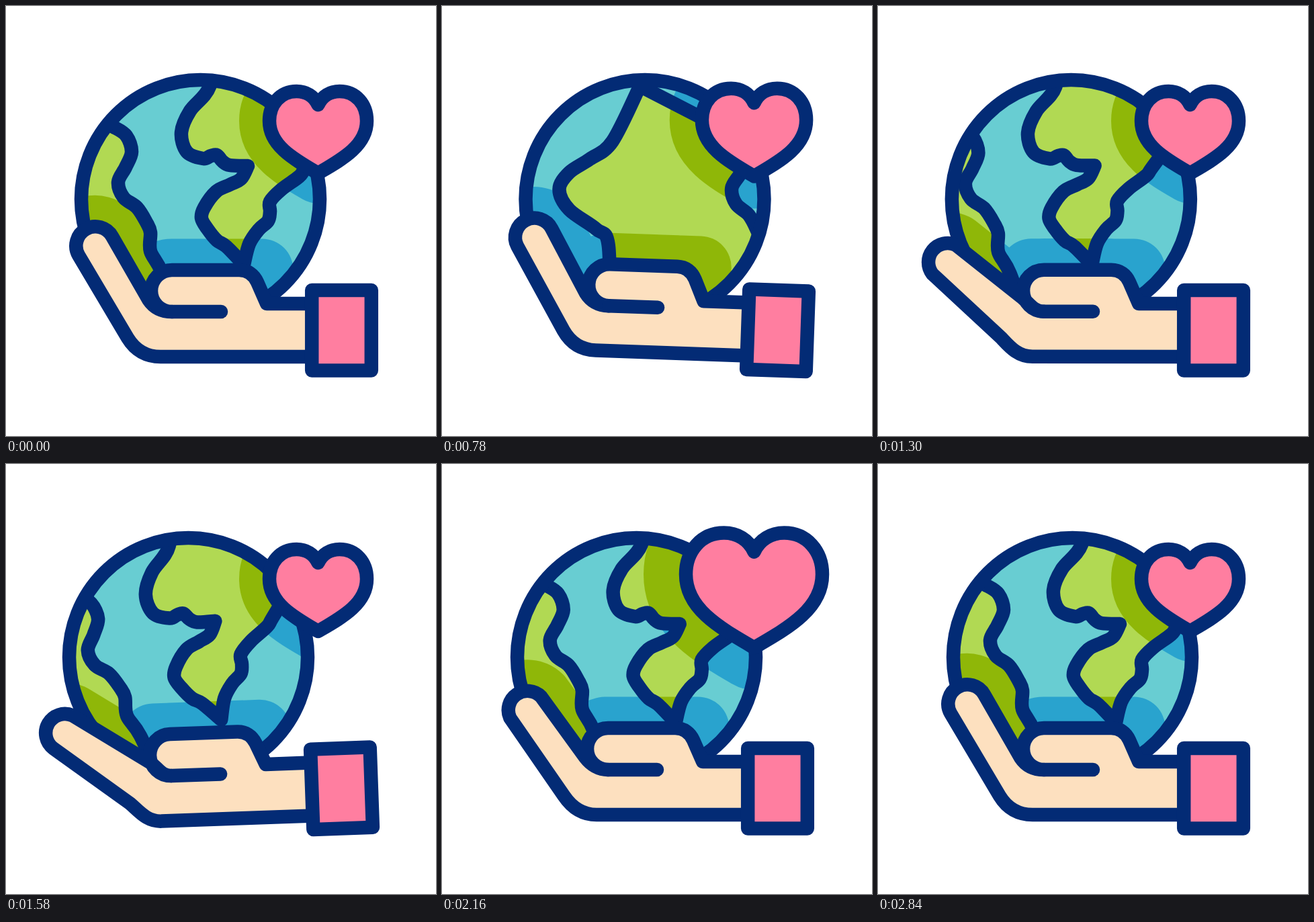
Write an HTML page that moves like this. It is 640 px wide and 640 px high and loops after 3020 ms.

```html
<!DOCTYPE html>
<html lang="en">
<head>
<meta charset="utf-8">
<title>Caring for the planet</title>
<style>
  html, body { margin: 0; width: 100%; height: 100%; overflow: hidden; background: #fff; }
  svg { display: block; width: 100vw; height: 100vh; }
  .line { stroke: #032b75; stroke-width: 20.5; stroke-linejoin: round; stroke-linecap: round; }
  .cast { fill: none; stroke: #fff; stroke-linejoin: round; stroke-linecap: round; }
</style>
</head>
<body>
<svg viewBox="0 0 640 640">
  <defs>
    <path id="continents"/>
    <g id="land">
      <use href="#continents" x="-600"/>
      <use href="#continents"/>
      <use href="#continents" x="600"/>
    </g>
    <path id="heartShape" d="M0 -41 C-6 -54 -18 -61 -32 -61 C-56 -61 -72.5 -42 -72.5 -17
      C-72.5 20 -36 40 0 61 C36 40 72.5 20 72.5 -17 C72.5 -42 56 -61 32 -61 C18 -61 6 -54 0 -41 Z"/>
    <clipPath id="globeClip"><circle id="clipDisc" cy="287.5" r="178"/></clipPath>
    <mask id="shade" maskUnits="userSpaceOnUse" x="0" y="0" width="640" height="640">
      <path id="handCast" class="cast" stroke-width="93"/>
      <use id="heartCast" class="cast" href="#heartShape" stroke-width="90"/>
    </mask>
  </defs>

  <g clip-path="url(#globeClip)">
    <rect width="640" height="640" fill="#68cdd2"/>
    <use href="#land" fill="#b1d953"/>
    <g mask="url(#shade)">
      <rect width="640" height="640" fill="#29a3ce"/>
      <use href="#land" fill="#8fb708"/>
    </g>
    <use href="#land" class="line" fill="none"/>
  </g>
  <circle id="ring" class="line" cy="287.5" r="177.5" fill="none"/>

  <g id="hand" class="line">
    <path id="palm" fill="#fde0bf"/>
    <path d="M247 455 H320" fill="none"/>
    <rect x="455.2" y="423" width="88.6" height="119.5" fill="#ff7ea0"/>
  </g>
  <use id="heart" class="line" href="#heartShape" fill="#ff7ea0"/>
</svg>

<script>
const LOOP = 3020, END = 2840, STEP = 20, BEAT = 1620;
const GLOBE = { x: 289.5, y: 287.5, r: 177.5 };
const MAP_WIDTH = 600, DRIFT = 0.033, DRIFT_END = 2350;

const $ = id => document.getElementById(id);
const set = (id, name, value) => $(id).setAttribute(name, value);
const mix = (a, b, k) => a + (b - a) * k;
const ramp = (t, from, to) => Math.min(1, Math.max(0, (t - from) / (to - from)));

// Smooth curve through a few points, as the tail of an SVG path.
function curve(text) {
  const p = text.split(' ').map(pair => pair.split(',').map(Number));
  const handle = (i, sign) => {
    const a = p[Math.max(i - 1, 0)], b = p[Math.min(i + 1, p.length - 1)];
    return p[i].map((v, k) => v + sign * (b[k] - a[k]) / 6);
  };
  return p[0] + p.slice(1).map((q, i) => `C${handle(i, 1)} ${handle(i + 1, -1)} ${q}`).join('');
}
const outline = (...coasts) => 'M' + coasts.map(curve).join('L') + 'Z';

const newWorld = outline(
  '309,60 303,120 274,156 261,188 269,217 293,227 305,223 314,222 322,231 333,237 360,238',
  '360,238 350,257 333,266 313,276 295,300 291,316 300,332 314,349 328,358 354,385',
  '354,385 362,354 376,333 390,320 393,306 393,291 410,273 436,254 446,241 489,184',
  '489,184 462,170 439,154 412,121 394,60');
const oldWorld = outline(
  '141,172 160,180 179,193 187,217 178,240 167,262 175,285 195,300 209,322 215,337 215,365 232,397 260,480',
  '0,480 -10,360 -30,337 -72,311 -89,282 -76,256 -47,234 -15,205 20,120');
set('continents', 'd', newWorld + oldWorld);

function handPath(bend) {
  const p = (x0, y0, x1, y1) => `${mix(x0, x1, bend)} ${mix(y0, y1, bend)} `;
  return 'M455 522 H230 C208 522 ' + p(192, 512, 197, 506) + p(181, 494, 184, 494) +
    'L' + p(108, 371, 73, 408) +
    'A28.5 28.5 0 0 1 ' + p(158, 343, 103, 360) +
    'L' + p(212, 437, 216, 434) +
    'C' + p(220, 449, 227, 442) + '232 455 247 455 ' +
    'A31 31 0 0 1 247 393 H347 C360 393 369 400 374 411 L388 443 H455';
}

function heartScale(t) {
  const u = t % BEAT;
  return 1 + 0.4 * ramp(u, 0, 540) - 0.6 * ramp(u, 540, 977) + 0.2 * ramp(u, 977, 1150);
}

// Right, left, right again, back to rest; each argument is the size of one swing.
const sway = (t, a, b, c) => a * ramp(t, 0, 400) - (a + b) * ramp(t, 1060, 1560)
  + (b + c) * ramp(t, 1640, 2420) - c * ramp(t, 2420, 2720);

// A slow drift with one quick turn; together they make a full revolution.
const spin = t => DRIFT * Math.min(t, DRIFT_END)
  + (MAP_WIDTH - DRIFT * DRIFT_END) * ramp(t, 520, 1125);

function draw(t) {
  const shift = sway(t, 12.5, 18, 9);
  const cx = GLOBE.x + shift;
  const roll = shift / GLOBE.r * 180 / Math.PI;
  const tilt = `rotate(${sway(t, 2, 2.05, 1.05)} 499.5 482.5)`;
  const bend = ramp(t, 900, 1420) - ramp(t, 1700, 2270);
  const palm = handPath(bend);
  const scale = heartScale(t);
  const beat = `translate(464.5 188) scale(${scale})`;

  set('ring', 'cx', cx);
  set('clipDisc', 'cx', cx);
  set('land', 'transform',
    `rotate(${roll} ${cx} ${GLOBE.y}) translate(${shift + spin(t) % MAP_WIDTH} 0)`);

  set('hand', 'transform', tilt);
  set('palm', 'd', palm);
  set('handCast', 'transform', tilt);
  set('handCast', 'd', `${palm}M${mix(247, 222, bend)} 393H381`);

  set('heart', 'transform', beat);
  $('heart').style.strokeWidth = 20.5 / scale;
  set('heartCast', 'transform', beat);
}

function tick() {
  const t = performance.now() % LOOP;
  draw(Math.min(END, Math.floor(t / STEP) * STEP));
  requestAnimationFrame(tick);
}
tick();
</script>
</body>
</html>
```
